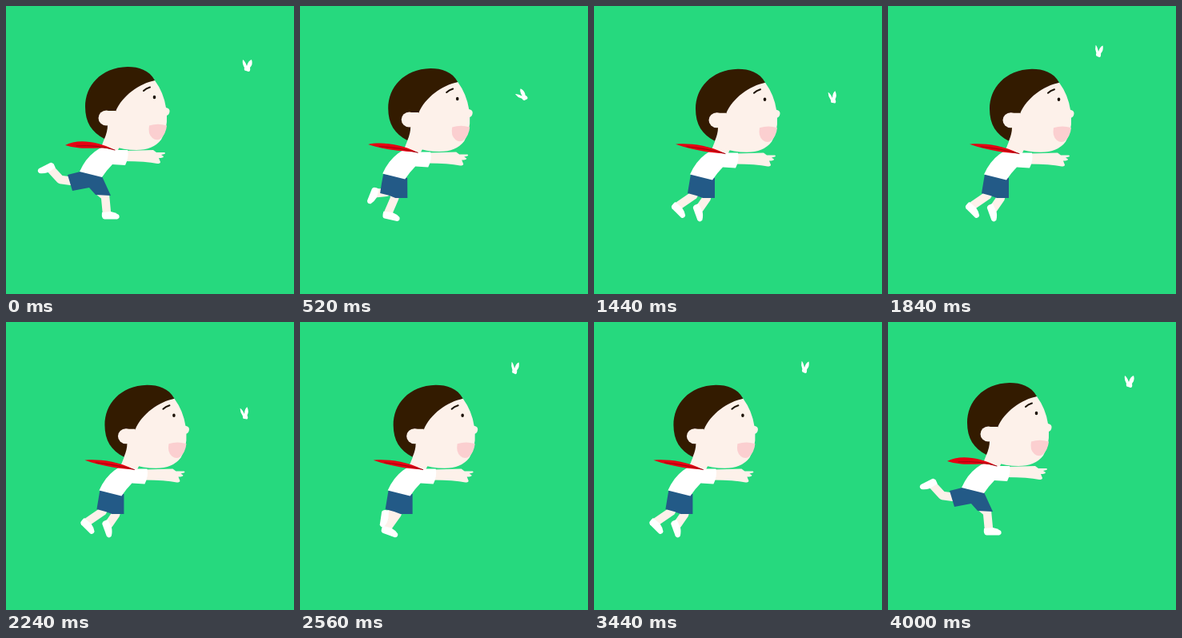
An HTML page that plays this animation: 360 by 360 pixels, repeating every 4040 ms.

```html
<!DOCTYPE html>
<html lang="en">
<head>
<meta charset="utf-8">
<title>Chasing a butterfly</title>
<style>
html, body { margin: 0; width: 100%; height: 100%; overflow: hidden; background: #26d97e; }
svg { display: block; width: 100%; height: 100%; }
.skin { fill: #fdf1ea; }
.hair { fill: #331b00; }
.white { fill: #fff; }
.line { fill: none; stroke-linecap: round; stroke-linejoin: round; }
</style>
</head>
<body>
<svg viewBox="0 0 360 360">
  <rect width="360" height="360" fill="#26d97e"/>
  <g id="boy">
    <g id="legs"></g>
    <path id="shorts" fill="#235a87"/>
    <g id="upper">
      <path class="skin" d="M127 148L123 166L117 181L138 184L150 160Z"/>
      <path class="skin" d="M148 181L184 180L188 183L198 183Q200 184 198 185L194 186L197 188Q197 190 191 190L193 195Q193 197 189 197Q175 194 148 194Z"/>
      <path class="white" d="M117 178L136 180L152 180Q154 189 149 199L133 198Q126 205 120 214L92 207Q99 191 111 182Z"/>
    </g>
    <path id="scarf" fill="#e60012"/>
    <path id="fold" class="line" stroke="#9c0410" stroke-width="1"/>
    <g id="head">
      <path class="skin" d="M186 93Q197 108 200 127Q205 128 204.500 132Q204 136 201 137Q202 154 194 167Q184 180 163 180Q146 180 134 175L123 166L127 148L133 125L155 98Z"/>
      <path class="hair" d="M186 93C179 80 166 76 152 76C118 77 99 100 99 126C99 145 107 158 123 166Q127 157 127 149L137 132C145 112 167 97 186 93Z"/>
      <ellipse class="skin" cx="125.500" cy="140" rx="10" ry="9.500"/>
      <path class="skin" d="M125 131L137 131L140 150L126 149Z"/>
      <path class="line" d="M172 106Q175 103 180 101.500" stroke="#1d1206" stroke-width="2"/>
      <ellipse cx="185.500" cy="114" rx="1.800" ry="2.200" fill="#1d1206"/>
      <path d="M179 149.500Q190 146 201 149.500Q200 160 193 166Q188 169 183 165Q177 160 179 149.500Z" fill="#fbcfd0"/>
    </g>
  </g>
  <path id="butterfly" class="white" d="M-1 6Q-4 6 -3 2Q-6 -3 -5 -8Q-2 -6 0 0Q2 -7 6 -8Q8 -2 4 2Q5 7 2 7Z"/>
</svg>
<script>
const LOOP = 4040, STRIDE = 800, STEP = STRIDE / 2, TICK = 40;
const $ = id => document.getElementById(id);
const lerp = (a, b, u) => a + (b - a) * u;

function ease(from, to, t) {
  const u = Math.min(1, Math.max(0, (t - from) / (to - from)));
  return u * u * (3 - 2 * u);
}

// Smooth periodic curve through keys of the form [time, ...values].
function curve(keys, t) {
  t %= STRIDE;
  const n = keys.length;
  const at = i => {
    const [time, ...values] = keys[(i + n) % n];
    return [time + Math.floor(i / n) * STRIDE, ...values];
  };
  const i = keys.findLastIndex(key => key[0] <= t);
  const [a, b, c, d] = [i - 1, i, i + 1, i + 2].map(at);
  const span = c[0] - b[0], u = (t - b[0]) / span, v = 1 - u;
  return b.slice(1).map((p, j) => {
    const q = c[j + 1];
    const m0 = (q - a[j + 1]) / (c[0] - a[0]) * span;
    const m1 = (d[j + 1] - p) / (d[0] - b[0]) * span;
    return v * v * (1 + 2 * u) * p + u * v * v * m0 + u * u * (3 - 2 * u) * q - u * u * v * m1;
  });
}

// One leg's stride: [time, knee x, knee y, ankle x, ankle y, foot angle]
const gait = [
  [0, 124, 238, 126, 259, 0],
  [80, 111, 240, 107, 260, 5],
  [240, 96, 237, 77, 250, 45],
  [400, 68, 217, 56, 204, 153],
  [480, 90, 229, 77, 226, 125],
  [640, 113, 240, 104, 253, 70]
];

// Butterfly: [time, x, y, tilt]
const flight = [
  [0, 301, 75, 0], [240, 263, 57, 5], [400, 337, 86, 0], [480, 279, 108, -50], [640, 298, 115, -10]
];

// Outline of the shorts in full stride and with the legs together
const wide = [93, 207, 77, 211, 83, 231, 104, 227, 112, 236, 131, 237, 120, 213];
const narrow = [93, 210, 91, 222, 89, 234, 100, 237, 108, 240, 123, 240, 123, 215];

const legs = [0, STEP].map(delay => {
  const group = document.createElementNS("http://www.w3.org/2000/svg", "g");
  group.innerHTML =
    `<path class="line" stroke="#fdf1ea" stroke-width="10.500"/>
     <path class="white" d="M-6 -1Q-7 7 -3 7.500L13 7.500Q17 6 15 2Q11 -1 5 -2Z"/>`;
  $("legs").append(group);
  const [limb, foot] = group.children;
  return { delay, limb, foot };
});

const move = (id, x, y) => $(id).setAttribute("transform", `translate(${x} ${y})`);

function draw(t) {
  const swing = Math.cos(2 * Math.PI * t / STEP);
  const sink = (1 - swing) / 2;

  move("boy", 28 * (ease(0, 1200, t) - ease(1860, 3560, t)), 0);
  move("head", 0, 3 * sink);
  move("upper", 0, 4 * sink);

  for (const { delay, limb, foot } of legs) {
    const [kx, ky, ax, ay, angle] = curve(gait, t + delay);
    limb.setAttribute("d", `M${(105 + kx) / 2} ${(222 + ky) / 2}L${kx} ${ky}L${ax} ${ay}`);
    foot.setAttribute("transform", `translate(${ax} ${ay}) rotate(${angle})`);
  }
  const closed = 1 - (1 - sink) ** 4;
  $("shorts").setAttribute("d", `M${wide.map((p, i) => lerp(p, narrow[i], closed)).join(" ")}Z`);

  const tipY = lerp(174, 172.5, sink), endY = lerp(180, 185, sink);
  $("scarf").setAttribute("d",
    `M74 ${tipY}C88 ${lerp(166, 172, sink)} 113 ${lerp(168, 173, sink)} 136 ${endY}` +
    `C116 ${lerp(174, 184, sink)} 100 ${lerp(182, 181, sink)} 74 ${tipY}Z`);
  $("fold").setAttribute("d", `M88 ${lerp(175, 176, sink)}Q114 ${lerp(173, 179, sink)} 136 ${endY}`);

  const [x, y, tilt] = curve(flight, t);
  $("butterfly").setAttribute("transform",
    `translate(${x} ${y}) rotate(${tilt}) scale(${0.9 + 0.1 * swing} 1)`);
}

const start = performance.now();
function frame() {
  const t = (performance.now() - start) % LOOP;
  draw(Math.floor(t / TICK) * TICK);
  requestAnimationFrame(frame);
}
frame();
</script>
</body>
</html>
```
